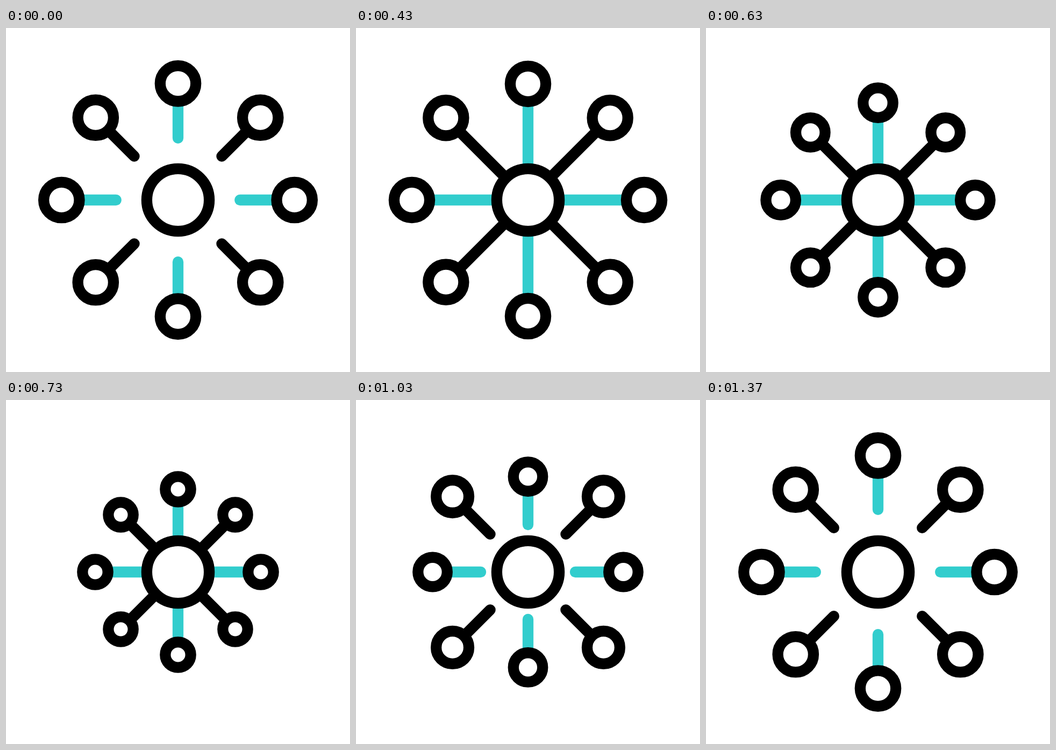
An HTML page with a canvas for the animation above (1.67 s loop, 640 by 640 pixels).

```html
<!DOCTYPE html>
<html lang="en">
<head>
<meta charset="utf-8">
<style>
html, body { margin: 0; width: 100%; height: 100%; overflow: hidden; background: #fff; }
canvas { display: block; width: 640px; height: 640px; }
</style>
</head>
<body>
<canvas width="640" height="640"></canvas>
<script>
const ctx = document.querySelector('canvas').getContext('2d');
const LOOP = 1670, LAST = 41;
const REST = 216.7, NODE_R = 33.2, HUB_R = 58.1, TIP = 116.2;

// Times are in steps of 1/30 s; travel is how far the node moves inward,
// pull is how much its spoke tip moves per pixel of that travel.
const groups = [
  { angle: 0, color: '#32cdcd', travel: 80.8, pull: 0.72, start: 12.3, turn: 24.1, end: 41.4 },
  { angle: Math.PI / 4, color: '#000', travel: 70, pull: 0.92, start: 12.3, turn: 22.5, end: 36.8 },
];

const clamp = v => Math.min(1, Math.max(0, v));
const smooth = u => u * u * (3 - 2 * u);

// cubic-bezier(1/3, 0, 5/6, 5/6): slow start, brisk finish
function easeIn(u) {
  let lo = 0, hi = 1;
  for (let i = 0; i < 24; i++) {
    const s = (lo + hi) / 2, q = 1 - s;
    if (s * q * q + 2.5 * q * s * s + s ** 3 < u) lo = s; else hi = s;
  }
  return 2.5 * (1 - lo) * lo * lo + lo ** 3;
}

function ring(x, r) {
  ctx.beginPath();
  ctx.arc(x, 0, r, 0, 2 * Math.PI);
  ctx.fill();
  ctx.stroke();
}

function pose(g, step) {
  const u = step < g.turn
    ? (step - g.start) / (g.turn - g.start)
    : (g.end - step) / (g.end - g.turn);
  const shift = g.travel * easeIn(clamp(u));
  const reach = step < g.turn
    ? g.pull * g.travel * smooth(clamp((step + 1) / (g.start + 1)))
    : g.pull * shift;
  return { dist: REST - shift, radius: NODE_R - 0.152 * shift, tip: TIP - reach };
}

function draw(step) {
  ctx.setTransform(1, 0, 0, 1, 0, 0);
  ctx.clearRect(0, 0, 640, 640);
  ctx.translate(320, 320);
  ctx.lineWidth = 20.3;
  ctx.lineCap = 'round';
  ctx.fillStyle = '#fff';
  for (const g of groups) {
    const { dist, radius, tip } = pose(g, step);
    ctx.save();
    ctx.rotate(g.angle);
    for (let i = 0; i < 4; i++) {
      ctx.strokeStyle = g.color;
      ctx.beginPath();
      ctx.moveTo(tip, 0);
      ctx.lineTo(dist - radius, 0);
      ctx.stroke();
      ctx.strokeStyle = '#000';
      ring(dist, radius);
      ctx.rotate(Math.PI / 2);
    }
    ctx.restore();
  }
  ring(0, HUB_R);
}

function tick() {
  const t = performance.now() % LOOP;
  draw(Math.min(LAST, Math.floor((Math.floor(t / 10) + 0.5) * 0.3)));
  requestAnimationFrame(tick);
}
tick();
</script>
</body>
</html>
```
